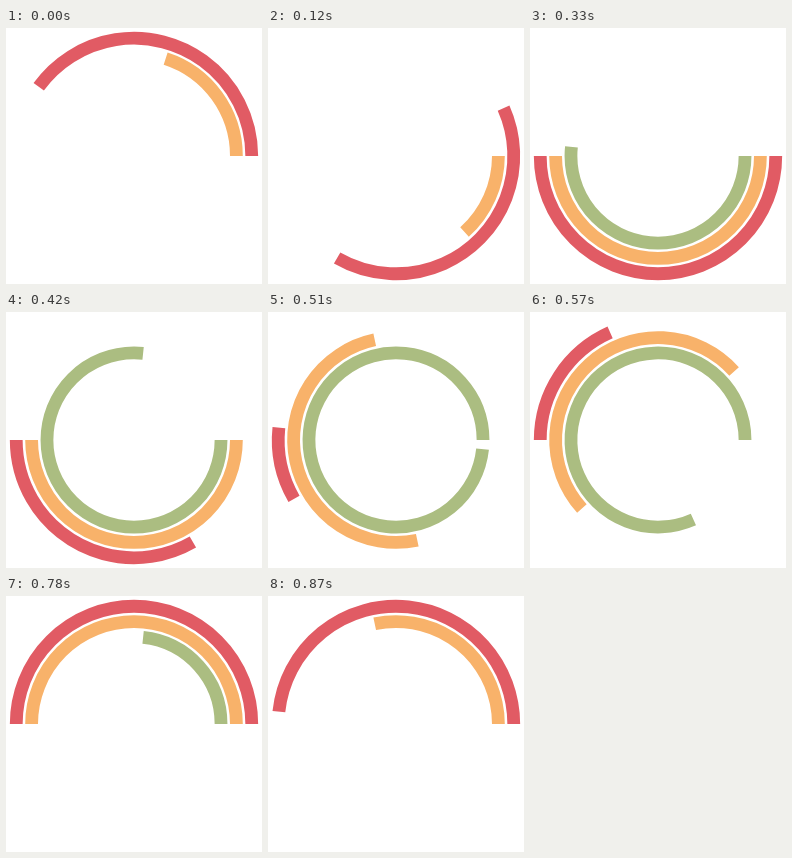
Write an HTML page with a canvas that moves like this. It is 256 px wide and 256 px high and loops after 0.9 s.

```html
<!DOCTYPE html>
<html lang="en">
<head>
<meta charset="utf-8">
<title>Rainbow spinner</title>
<style>
  html, body { margin: 0; width: 100%; height: 100%; overflow: hidden; background: #fff; }
  canvas { display: block; width: 256px; height: 256px; }
</style>
</head>
<body>
<canvas id="stage" width="256" height="256"></canvas>
<script>
  const LOOP = 900, STEP = 30, HALF = 180;

  // Each start time begins a half turn at one degree per millisecond.
  const rings = [
    { color: '#e15b64', radius: 117.76, head: [0, 504], tail: [-36, 360, 864] },
    { color: '#f8b26a', radius: 102.4, head: [72, 432], tail: [-108, 432, 792] },
    { color: '#abbd81', radius: 87.04, head: [144, 324], tail: [504, 684] }
  ];

  const ctx = document.getElementById('stage').getContext('2d');
  ctx.lineWidth = 12.8;

  const turned = (starts, t) =>
    starts.reduce((sum, s) => sum + Math.min(HALF, Math.max(0, t - s)), 0);
  const rad = deg => deg * Math.PI / 180;

  function draw(t) {
    ctx.clearRect(0, 0, 256, 256);
    for (const { color, radius, head, tail } of rings) {
      const lag = (tail.length - head.length) * HALF;
      const from = turned(tail, t) - lag;
      const to = turned(head, t);
      if (to <= from) continue;
      ctx.strokeStyle = color;
      ctx.beginPath();
      ctx.arc(128, 128, radius, rad(from), rad(to));
      ctx.stroke();
    }
  }

  const start = performance.now();

  function tick() {
    // The small lead keeps timer jitter from showing a late step.
    const elapsed = performance.now() - start + 4;
    draw(Math.floor(elapsed / STEP) * STEP % LOOP);
    requestAnimationFrame(tick);
  }
  tick();
</script>
</body>
</html>
```
